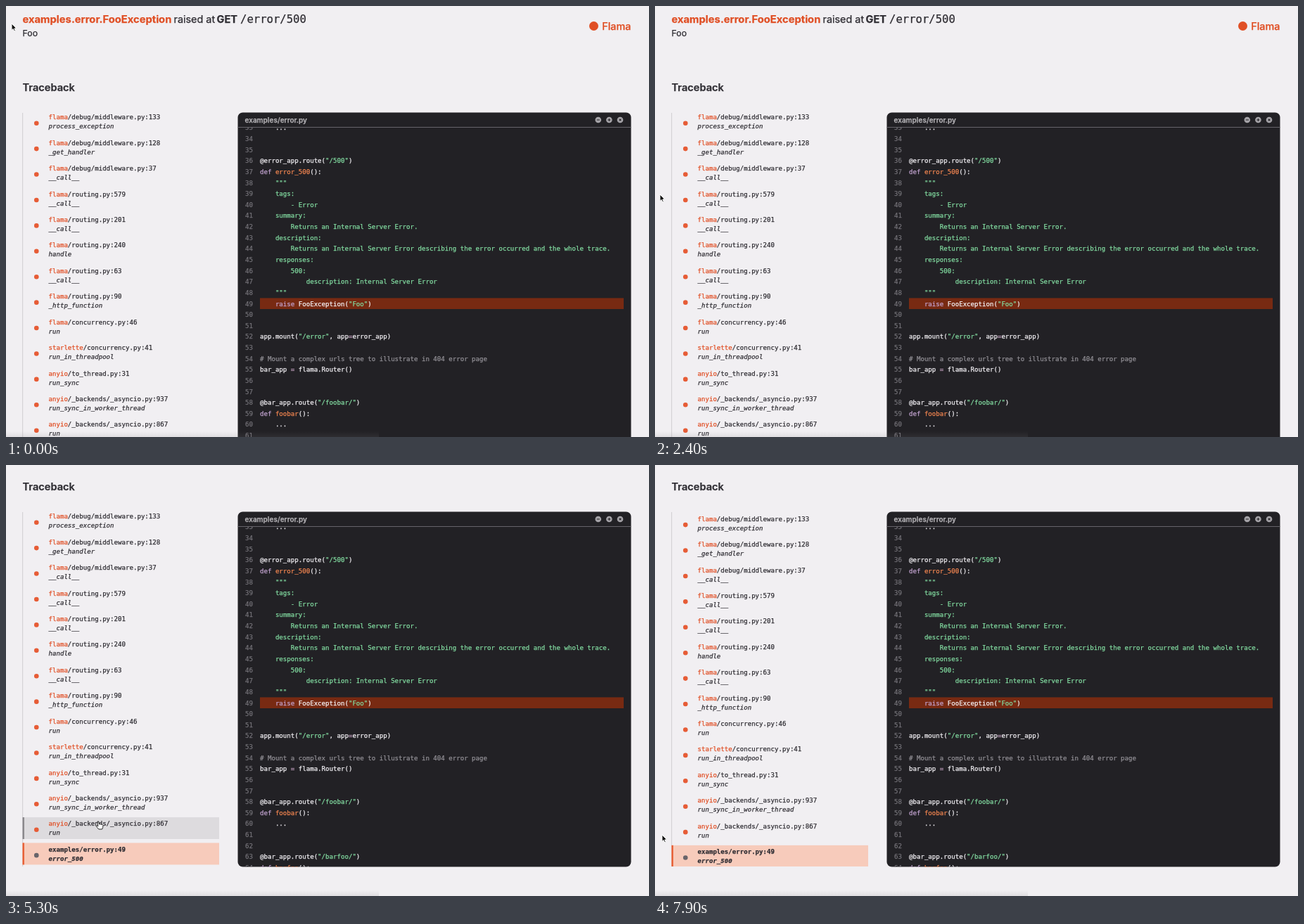
Recreate the animation shown at these times as an HTML page with a canvas. Size 914x613 px, loop 8000 ms.

```html
<!DOCTYPE html>
<html lang="en">
<head>
<meta charset="utf-8">
<title>Traceback</title>
<style>
html, body { margin: 0; width: 914px; height: 613px; overflow: hidden; background: #f1eff2; }
canvas { display: block; }
</style>
</head>
<body>
<canvas id="c" width="914" height="613"></canvas>
<script>
const ctx = document.getElementById('c').getContext('2d');
const LOOP = 8000, STEP = 100;
const SANS = 'Inter, Roboto, sans-serif';
const MONO = '"DejaVu Sans Mono", "Noto Sans Mono", monospace';
const BG = '#f1eff2', INK = '#2f2d33', ORANGE = '#e04f25', DARK = '#222125';
const ROW = 15.63, ITEM = 36.42;
const CODE_TOP = 173, CODE_H = 483, PAGE_SCROLL = 85;

const TRACE = `flama/debug/middleware.py:133 process_exception
flama/debug/middleware.py:128 _get_handler
flama/debug/middleware.py:37 __call__
flama/routing.py:579 __call__
flama/routing.py:201 __call__
flama/routing.py:240 handle
flama/routing.py:63 __call__
flama/routing.py:90 _http_function
flama/concurrency.py:46 run
starlette/concurrency.py:41 run_in_threadpool
anyio/to_thread.py:31 run_sync
anyio/_backends/_asyncio.py:937 run_sync_in_worker_thread
anyio/_backends/_asyncio.py:867 run
examples/error.py:49 error_500`.split('\n').map(s => s.split(' '));

const ERROR_CODE = `import flama
from flama import Flama

app = Flama(
    title="Error",
    version="1.0",
    description="Error pages",
)


@app.route("/")
def home():
    """
    tags:
        - Home
    summary:
        Returns a message.
    description:
        Returns a message.
    responses:
        200:
            description: Message
    """
    return "Home"



error_app = Flama()



class FooException(Exception):
    ...


@error_app.route("/500")
def error_500():
    """
    tags:
        - Error
    summary:
        Returns an Internal Server Error.
    description:
        Returns an Internal Server Error describing the error occurred and the whole trace.
    responses:
        500:
            description: Internal Server Error
    """
    raise FooException("Foo")


app.mount("/error", app=error_app)

# Mount a complex urls tree to illustrate in 404 error page
bar_app = flama.Router()


@bar_app.route("/foobar/")
def foobar():
    ...


@bar_app.route("/barfoo/")
def barfoo():
    ...`.split('\n');

const WORKER_CODE = `      if exc is not None:
        future.set_exception(exc)
      else:
        future.set_result(result)

  def run(self) -> None:
    with claim_worker_thread("asyncio"):
      threadlocals.loop = self.loop
      while True:
        item = self.queue.get()
        if item is None:
          # Shutdown command received
          return

        context, func, args, future = item
        if not future.cancelled():
          result = None
          exception: Optional[BaseException] = None
          try:
            result = context.run(func, *args)
          except BaseException as exc:
            exception = exc

          if not self.loop.is_closed():
            self.loop.call_soon_threadsafe(
              self._report_result, future, result, exception
            )

        self.queue.task_done()

  def stop(self, f: Optional[asyncio.Task] = None) -> None:`
  .split('\n').map(s => s.replace(/^ +/, p => p + p));

const FILES = {
  error: { name: 'examples/error.py', item: 13, hit: 49, total: 75, x: 361,
    line: n => ERROR_CODE[n - 1] || '',
    doc: n => (n > 12 && n < 24) || (n > 37 && n < 49) },
  worker: { name: 'anyio/_backends/_asyncio.py', item: 12, hit: 867, total: 2180, x: 372,
    line: n => WORKER_CODE[((n - 848) % 31 + 31) % 31],
    doc: () => false }
};

const clamp = v => Math.max(0, Math.min(1, v));
const ease = v => v < .5 ? 4 * v ** 3 : 1 - 4 * (1 - v) ** 3;
const ramp = (t, a, b) => ease(clamp((t - a) / (b - a)));
const flash = (t, on, off) => t < on ? 0 : 1 - clamp((t - off) / 250);

// A hairline stroke gives the text a slightly fuller weight
function text(s, x, y, color, font, align = 'left') {
  ctx.font = font;
  ctx.fillStyle = ctx.strokeStyle = color;
  ctx.textAlign = align;
  ctx.lineWidth = .25;
  ctx.fillText(s, x, y);
  ctx.strokeText(s, x, y);
  return ctx.measureText(s).width;
}
function rect(x, y, w, h, color) {
  ctx.fillStyle = color;
  ctx.fillRect(x, y, w, h);
}
function round(x, y, w, h, r, color) {
  ctx.fillStyle = color;
  ctx.beginPath();
  ctx.roundRect(x, y, w, h, r);
  ctx.fill();
}
function dot(x, y, r, color) {
  ctx.fillStyle = color;
  ctx.beginPath();
  ctx.arc(x, y, r, 0, 7);
  ctx.fill();
}
function clipped(x, y, w, h, r, draw) {
  ctx.save();
  ctx.beginPath();
  ctx.roundRect(x, y, w, h, r);
  ctx.clip();
  draw();
  ctx.restore();
}
function thumb(x, y, w, h, color, alpha) {
  if (alpha <= 0) return;
  ctx.globalAlpha = alpha;
  round(x, y, w, h, w / 2, color);
  ctx.globalAlpha = 1;
}

// Pointer tip: time, x, y
const PATH = [[0, 8, 25], [1200, 8, 25], [2300, 7, 268], [3450, 7, 268], [3900, 86, 450],
  [4500, 92, 452], [5300, 131, 507], [5700, 133, 512], [6100, 137, 536], [6400, 138, 549],
  [6750, 138, 549], [7200, 9, 528], [7500, 10, 526], [8000, 10, 526]];
function pointer(t) {
  const i = PATH.findIndex(p => p[0] > t);
  const [t0, x0, y0] = PATH[i - 1], [t1, x1, y1] = PATH[i];
  const k = ramp(t, t0, t1);
  return [x0 + (x1 - x0) * k, y0 + (y1 - y0) * k];
}

function shape(x, y, pts, fill, stroke) {
  ctx.beginPath();
  for (let i = 0; i < pts.length; i += 2) ctx.lineTo(x + pts[i], y + pts[i + 1]);
  ctx.closePath();
  ctx.lineJoin = 'round';
  ctx.lineWidth = 1;
  ctx.fillStyle = fill;
  ctx.strokeStyle = stroke;
  ctx.fill();
  ctx.stroke();
}
const ARROW = [0, 0, 0, 9.5, 2.2, 7.6, 3.8, 11, 5.4, 10.3, 3.9, 7, 6.8, 6.8];
const HAND = [-1, 0, .7, 0, 1.6, 4, 3, 3.6, 4.4, 4.2, 6, 4.4, 7, 5.4, 6.6, 8.6, 5.6, 11,
  .8, 11, -1.6, 8.4, -2.8, 6.2, -1.6, 5.8, -.2, 7];

function header() {
  text('examples.error.FooException', 23.5, 23.5, ORANGE, '700 14.75px ' + SANS);
  text('raised at', 238.5, 23.5, INK, '400 14.4px ' + SANS);
  text('GET', 299.5, 23.5, INK, '700 14.5px ' + SANS);
  text('/error/500', 333, 23.5, INK, '15.6px ' + MONO);
  text('Foo', 23.5, 42.6, INK, '400 12.3px ' + SANS);
  dot(835.5, 28.5, 6.5, ORANGE);
  text('Flama', 888.5, 33.7, ORANGE, '500 14.4px ' + SANS, 'right');
  text('Traceback', 23.5, 120.8, INK, '600 14.6px ' + SANS);
}

function list(active, shift, tip) {
  clipped(20, 152, 290, 504, 0, () => {
    rect(23, 152, 1.2, 504, '#d5d3d6');
    TRACE.forEach(([path, fn], i) => {
      const top = 149 + i * ITEM + shift, on = i === active;
      const hover = tip[0] > 24 && tip[0] < 303 && tip[1] > top && tip[1] < top + 31;
      if (on || hover) {
        rect(23.5, top, 279.5, 31, on ? '#f7cbbb' : '#dddbde');
        rect(23.5, top, 2.5, 31, on ? '#e8623a' : '#8b898d');
      }
      dot(43.3, top + 17.7, 3.3, i === 13 ? '#68646a' : '#e65c36');
      const cut = i === 13 ? 0 : path.indexOf('/');
      const font = (on ? '700' : '400') + ' 9.1px ' + MONO;
      const w = text(path.slice(0, cut), 60.5, top + 12.3, ORANGE, font);
      text(path.slice(cut), 60.5 + w, top + 12.3, INK, font);
      text(fn, 60.5, top + 25.3, INK, 'italic ' + font);
    });
  });
}

const TOKEN = /#.*|"[^"]*"|\w+|[^\w"#]+/g;
const KEYWORDS = 'def class raise if else elif is not with while return try except as import from'.split(' ');
function tokenColor(k, last) {
  if (k[0] === '#') return '#918f95';
  if (k[0] === '"') return '#82dca1';
  if (KEYWORDS.includes(k)) return '#c2a3d0';
  if (last === 'class') return '#f2a05c';
  if (last === 'def' || k === 'None' || k === 'True') return '#f28550';
  return /^ ?(=|->) ?$/.test(k) ? '#cfaacb' : '#f4f2f6';
}
function codeLine(s, x, y, doc) {
  const font = '9.1px ' + MONO;
  const body = s.trimStart();
  ctx.font = font;
  x += ctx.measureText(' ').width * (s.length - body.length);
  if (doc) return text(body, x, y, '#82dca1', font);
  let last = '';
  for (const k of body.match(TOKEN) || []) {
    x += text(k, x, y, tokenColor(k, last), font);
    if (k.trim()) last = k;
  }
}

function panel(file, scroll, barAlpha) {
  clipped(329.5, 151.5, 559, 505, 7, () => {
    rect(329, 151, 560, 506, DARK);
    text(file.name, 339.5, 165.8, '#b3b1b5', '600 10px ' + SANS);
    ['-', '+', 'x'].forEach((sign, i) => {
      ctx.save();
      ctx.translate(841.8 + i * 15.6, 162);
      dot(0, 0, 4.3, '#a5a3a8');
      if (sign === 'x') ctx.rotate(Math.PI / 4);
      rect(-2, -.5, 4, 1, DARK);
      if (sign !== '-') rect(-.5, -2, 1, 4, DARK);
      ctx.restore();
    });
    rect(329, 172, 560, 1, '#66646a');
    clipped(329, CODE_TOP, 560, CODE_H + 1, 0, () => {
      const first = Math.max(1, Math.floor(scroll / ROW));
      for (let n = first; n < first + 34 && n <= file.total; n++) {
        const y = CODE_TOP + 7.8 + (n - 1) * ROW - scroll;
        if (n === file.hit) rect(file.x, y - 7.8, 878 - file.x, ROW, '#782a12');
        text(n, file.x - 10, y + 3.3, '#737177', '9.1px ' + MONO, 'right');
        codeLine(file.line(n), file.x, y + 3.3, file.doc(n));
      }
    });
    const full = file.total * ROW, size = Math.max(14, CODE_H * CODE_H / full);
    const y = CODE_TOP + scroll / (full - CODE_H) * (CODE_H - size);
    thumb(883, y, 4.5, size, '#0c0b0e', barAlpha);
  });
}

function draw(t) {
  const onWorker = t >= 5500 && t < 6600;
  const file = onWorker ? FILES.worker : FILES.error;
  const start = onWorker ? 5500 : t >= 6600 ? 6600 : 100;
  const moved = t < 100 ? 1 : ramp(t, start, start + (onWorker ? 667 : 406));
  const scroll = ((file.hit - 1) * ROW - 242.4) * moved;
  const bar = t < 5500 ? flash(t, 100, 1000) : flash(t, 5500, 7350);
  const page = PAGE_SCROLL * ramp(t, 2850, 3550);
  const [px, py] = pointer(t);

  rect(0, 0, 914, 613, BG);
  ctx.save();
  ctx.translate(0, -page);
  header();
  thumb(297.3, 219, 4.6, 436, '#7c7a7f', bar);
  list(file.item, t >= 6600 ? 3.4 : 0, [px, py + page]);
  panel(file, scroll, bar);
  ctx.restore();

  thumb(908.8, page * .44, 4.4, 278, '#78767b', flash(t, 2850, 4000));
  const shade = ctx.createLinearGradient(0, 605, 0, 613);
  shade.addColorStop(0, 'rgba(120,118,122,0)');
  shade.addColorStop(1, 'rgba(120,118,122,.14)');
  rect(0, 605, 530, 8, shade);

  if (px > 24) shape(px, py, HAND, '#fff', '#222');
  else shape(px, py, ARROW, '#111', '#fff');
}

function frame() {
  draw(Math.floor(performance.now() % LOOP / STEP) * STEP);
  requestAnimationFrame(frame);
}
frame();
</script>
</body>
</html>
```
